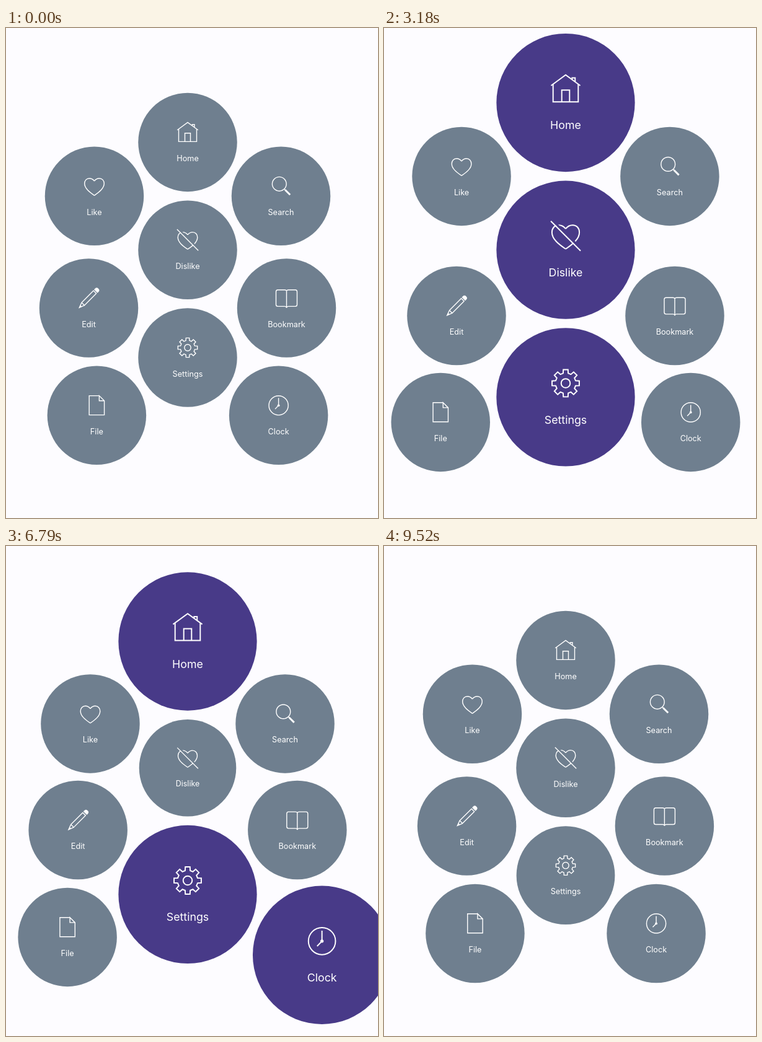
Recreate the animation shown at these times as an HTML page with a canvas. Size 600 by 791 pixels, loop 9560 ms.

```html
<!DOCTYPE html>
<html lang="en">
<head>
<meta charset="utf-8">
<title>Bubble menu</title>
<style>
  html, body { margin: 0; width: 100%; height: 100%; overflow: hidden; background: #fdfcff; }
  canvas { display: block; width: 600px; height: 791px; }
</style>
</head>
<body>
<canvas id="stage" width="600" height="791"></canvas>
<script>
const ctx = document.getElementById('stage').getContext('2d');
const LOOP = 9560, MID = 293, DISLIKE_Y = 358.2;
const SMALL = 79.75, GROWTH = 1.4, GAP = 14.3;
const PAPER = [253, 252, 255], SLATE = [111, 127, 143], PURPLE = [72, 58, 136];

const lerp = (a, b, t) => a + (b - a) * t;
const mix = (a, b, t) => a.map((v, i) => lerp(v, b[i], t));
const PALE = mix(PAPER, PURPLE, 0.2);

// Each tap: item, press time, release time, resting place of the Edit / Bookmark pair.
const taps = [
  ['Home', 850, 1060, 134.5, 461.4],
  ['Dislike', 1850, 1872, 116.7, 464.5],
  ['Settings', 2610, 2785, 117, 464.5],
  ['Edit', 3550, 3572, 117, 464.5],
  ['Clock', 4480, 4578, 117, 464.5],
  ['Edit', 5610, 5782, 117, 464.5],
  ['Dislike', 6430, 6575, 116.2, 458.7],
  ['Clock', 7300, 7472, 116.2, 458.7],
  ['Home', 8080, 8150, 125, 446],
  ['Settings', 8780, 8925, 133.5, 452]
];

// Centre of a circle that keeps the gap to both a and b.
function nestle(a, b, r, side) {
  const dx = b.x - a.x, dy = b.y - a.y, d = Math.hypot(dx, dy);
  const ra = a.r + r + GAP, rb = b.r + r + GAP;
  const along = (ra * ra - rb * rb + d * d) / (2 * d);
  const off = side * Math.sqrt(Math.max(0, ra * ra - along * along));
  return { x: a.x + (dx * along - dy * off) / d, y: a.y + (dy * along + dx * off) / d, r };
}

function layout(selected, pairX, pairY) {
  const size = name => selected.has(name) ? SMALL * GROWTH : SMALL;
  const p = {};
  p.Dislike = { x: MID, y: DISLIKE_Y, r: size('Dislike') };
  p.Home = { x: MID, y: DISLIKE_Y - p.Dislike.r - size('Home') - GAP, r: size('Home') };
  p.Settings = { x: MID, y: DISLIKE_Y + p.Dislike.r + size('Settings') + GAP, r: size('Settings') };
  p.Like = nestle(p.Home, p.Dislike, SMALL, 1);
  p.Search = nestle(p.Home, p.Dislike, SMALL, -1);
  p.Edit = selected.has('Edit')
    ? { x: 75.5, y: 455, r: size('Edit') }
    : { x: pairX, y: pairY, r: SMALL };
  p.Bookmark = { x: 2 * MID - pairX, y: pairY, r: SMALL };
  p.File = nestle(p.Edit, p.Settings, SMALL, 1);
  p.Clock = nestle(p.Bookmark, p.Settings, size('Clock'), -1);
  return p;
}

const poses = [layout(new Set(), 133.5, 452)];
const choices = [new Set()];
for (const [name, , , x, y] of taps) {
  const next = new Set(choices[choices.length - 1]);
  if (!next.delete(name)) next.add(name);
  choices.push(next);
  poses.push(layout(next, x, y));
}

// Underdamped spring with a strong initial push.
function spring(ms) {
  if (ms <= 0) return 0;
  if (ms > 660) return 1;
  const t = ms / 1000, w = 34.1 * t;
  return 1 + Math.exp(-6.9 * t) * (0.765 * Math.sin(w) - Math.cos(w));
}

function line(...pts) {
  ctx.beginPath();
  for (let i = 0; i < pts.length; i += 2) ctx.lineTo(pts[i], pts[i + 1]);
  ctx.stroke();
}
function ring(x, y, r) {
  ctx.beginPath();
  ctx.arc(x, y, r, 0, 7);
  ctx.stroke();
}
function dot(x, y, r) {
  ctx.beginPath();
  ctx.arc(x, y, r, 0, 7);
  ctx.fill();
}
function heart() {
  ctx.beginPath();
  ctx.moveTo(0, -24.3);
  for (const s of [1, -1]) {
    ctx.moveTo(0, -24.3);
    ctx.bezierCurveTo(s * 2.4, -27.6, s * 5, -28.6, s * 8, -28.6);
    ctx.bezierCurveTo(s * 12.7, -28.6, s * 15.8, -25, s * 15.8, -20.2);
    ctx.bezierCurveTo(s * 15.8, -12.5, s * 8, -6.5, 0, -1);
  }
  ctx.stroke();
}

const icons = {
  Home() {
    line(-16.8, -19.7, 0, -32, 16.8, -19.7);
    line(-14.5, -21.2, -14.5, -1, 14.5, -1, 14.5, -21.2);
    line(-4.5, -1, -4.5, -14.6, 4.5, -14.6, 4.5, -1);
    line(7.4, -26.8, 7.4, -28.6, 10.9, -28.6, 10.9, -24.2);
  },
  Like: heart,
  Dislike(fill) {
    heart();
    ctx.save();
    ctx.strokeStyle = fill;
    ctx.lineWidth = 2.6;
    line(-15.3, -34.2, 18.5, -0.4);
    ctx.restore();
    line(-17.1, -33.2, 17.2, 1.1);
  },
  Search() {
    ring(-2.7, -19.5, 11.4);
    line(5.3, -11.4, 7, -9.7);
    ctx.save();
    ctx.lineWidth = 2.9;
    line(6.6, -10.1, 14.7, -2);
    ctx.restore();
  },
  Edit() {
    ctx.save();
    ctx.translate(-15.6, -0.2);
    ctx.rotate(-Math.PI / 4);
    line(9, -3.2, 0.6, 0, 9, 3.2);
    line(9, -3.2, 36, -3.2, 36, 3.2, 9, 3.2, 9, -3.2);
    ctx.beginPath();
    ctx.moveTo(0, 0);
    ctx.lineTo(4.6, -1.9);
    ctx.lineTo(4.6, 1.9);
    ctx.fill();
    ctx.beginPath();
    ctx.roundRect(38, -3.9, 6, 7.8, [0, 3.6, 3.6, 0]);
    ctx.fill();
    ctx.restore();
  },
  Bookmark() {
    for (const s of [1, -1]) {
      ctx.beginPath();
      ctx.moveTo(0, -27.6);
      ctx.quadraticCurveTo(s * 0.8, -29.3, s * 3, -29.3);
      ctx.lineTo(s * 14, -29.3);
      ctx.quadraticCurveTo(s * 17, -29.3, s * 17, -26.3);
      ctx.lineTo(s * 17, -5.4);
      ctx.quadraticCurveTo(s * 17, -2.6, s * 14, -2.6);
      ctx.lineTo(s * 3, -2.6);
      ctx.quadraticCurveTo(s * 0.8, -2.6, 0, -0.8);
      ctx.stroke();
    }
    line(0, -27.6, 0, -0.2);
  },
  Settings() {
    ctx.beginPath();
    for (let i = 0; i < 8; i++) {
      for (const [r, a] of [[11.8, -0.25], [15.9, -0.17], [15.9, 0.17], [11.8, 0.25]]) {
        const t = i * Math.PI / 4 + a;
        ctx.lineTo(r * Math.sin(t), -16 - r * Math.cos(t));
      }
    }
    ctx.closePath();
    ctx.stroke();
    ring(0, -16, 5.2);
  },
  File() {
    line(4, -31.7, -12.2, -31.7, -12.2, -0.7, 12.2, -0.7, 12.2, -23.5, 4, -31.7, 4, -23.5, 12.2, -23.5);
  },
  Clock() {
    ring(0, -16, 15.6);
    line(0, -28, 0, -16, -5.6, -10.2);
    dot(0, -16, 1.9);
  }
};
const names = Object.keys(icons);

function bubble(name, { x, y, r }, color) {
  const fill = `rgb(${color.map(Math.round)})`;
  ctx.save();
  ctx.translate(x, y);
  ctx.fillStyle = fill;
  dot(0, 0, r);
  ctx.scale(r / SMALL, r / SMALL);
  ctx.strokeStyle = ctx.fillStyle = '#fff';
  ctx.lineWidth = 1.4;
  icons[name](fill);
  ctx.fillText(name, 0, 30.5);
  ctx.restore();
}

function draw(now) {
  let step = 0;
  while (step < taps.length && now >= taps[step][1]) step++;
  const [tapped, , release] = step ? taps[step - 1] : ['', 0, 0];
  const from = poses[Math.max(0, step - 1)], to = poses[step];
  const k = spring(now - release);
  const left = 1 - Math.min(1, Math.max(0, (now - release) / 250));
  const fade = 1 - left ** 3;

  ctx.fillStyle = `rgb(${PAPER})`;
  ctx.fillRect(0, 0, 600, 791);
  ctx.font = '12.7px Inter, Roboto, sans-serif';
  ctx.textAlign = 'center';
  for (const name of names) {
    const a = from[name], b = to[name];
    const pose = { x: lerp(a.x, b.x, k), y: lerp(a.y, b.y, k), r: lerp(a.r, b.r, k) };
    const rest = choices[step].has(name) ? PURPLE : SLATE;
    bubble(name, pose, name === tapped ? mix(PALE, rest, fade) : rest);
  }
}

const begin = performance.now();
function tick() {
  draw((performance.now() - begin) % LOOP);
  requestAnimationFrame(tick);
}
tick();
</script>
</body>
</html>
```
